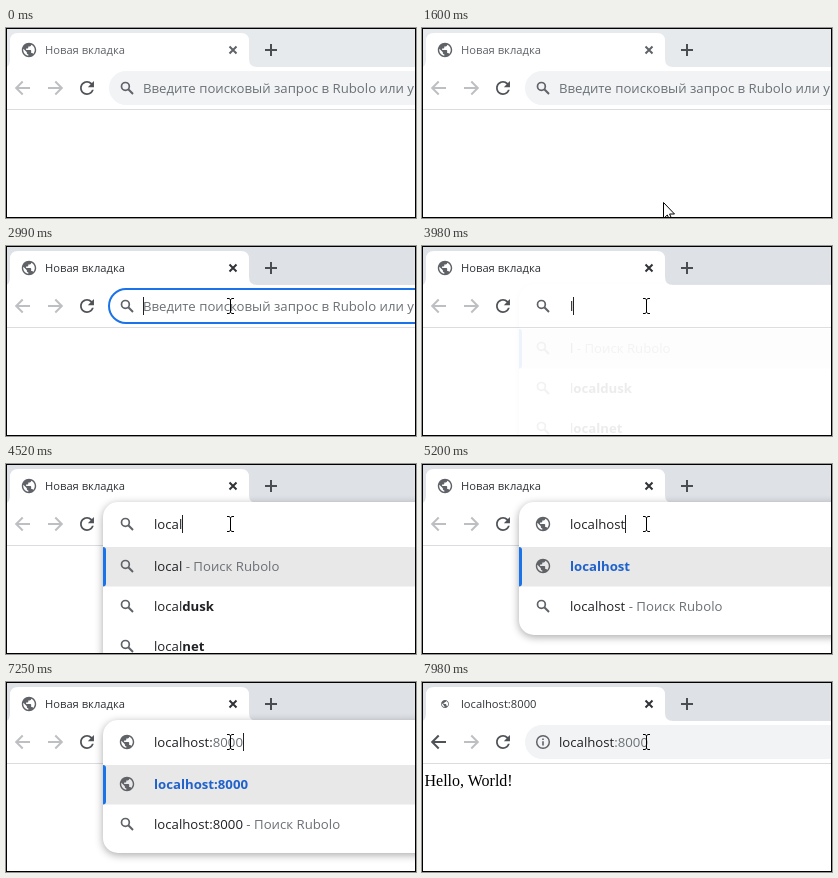
An HTML page for the animation above (8 s loop, 410 by 190 pixels).

```html
<!DOCTYPE html>
<html lang="ru">
<head>
<meta charset="utf-8">
<title>localhost</title>
<style>
  html, body { margin: 0; width: 100%; height: 100%; overflow: hidden; background: #fff; }
  svg { display: block; width: 410px; height: 190px; }
  text { font: 13.2px "Open Sans", "Noto Sans", sans-serif; fill: #202124; white-space: pre; }
  .b { font-weight: 700; }
  .url { font-weight: 700; fill: #1f62cc; }
  .dim { fill: #6b7075; }
  #title { font-size: 11.2px; }
  #page { font: 16px "Liberation Serif", serif; fill: #000; }
  .line { fill: none; stroke: currentColor; stroke-width: 2; }
</style>
</head>
<body>
<svg viewBox="0 0 410 190">
  <defs>
    <filter id="blur" x="-10%" y="-20%" width="120%" height="140%"><feGaussianBlur stdDeviation="4"/></filter>
    <g id="globe"><path transform="scale(.72) translate(-12 -12)" fill="currentColor" d="M12 2C6.48 2 2 6.48 2 12s4.48 10 10 10 10-4.48 10-10S17.52 2 12 2zm-1 17.93c-3.95-.49-7-3.85-7-7.93 0-.62.08-1.21.21-1.79L9 15v1c0 1.1.9 2 2 2v1.93zm6.9-2.54c-.26-.81-1-1.39-1.9-1.39h-1v-3c0-.55-.45-1-1-1H8v-2h2c.55 0 1-.45 1-1V7h2c1.1 0 2-.9 2-2v-.41c2.93 1.19 5 4.06 5 7.41 0 2.08-.8 3.97-2.1 5.39z"/></g>
    <g id="search" class="line"><circle cx="-1.6" cy="-1.6" r="3.9" stroke-width="1.7"/><path d="M1.3 1.3L6 6"/></g>
    <g id="info" class="line"><circle r="6.3" stroke-width="1.5"/><path stroke-width="1.6" d="M0 -3.6v1.6M0 -.8v4.2"/></g>
    <path id="back" class="line" d="M7 0H-6M-.3 -6.5L-6.8 0L-.3 6.5"/>
    <path id="reload" transform="scale(.87) translate(-12 -12)" fill="currentColor" d="M17.65 6.35C16.2 4.9 14.21 4 12 4c-4.42 0-7.99 3.58-7.99 8s3.57 8 7.99 8c3.73 0 6.84-2.55 7.73-6h-2.08c-.82 2.33-3.04 4-5.65 4-3.31 0-6-2.69-6-6s2.69-6 6-6c1.66 0 3.14.69 4.22 1.78L13 11h7V4l-2.35 2.35z"/>
    <path id="cross" class="line" d="M-5.5 -5.5L5.5 5.5M5.5 -5.5L-5.5 5.5"/>
  </defs>

  <rect width="410" height="190" fill="#fff"/>
  <rect id="strip" width="410" height="39"/>
  <path fill="#fff" d="M0 39Q4 38 4 31V13Q4 5 12 5H235Q243 5 243 13V31Q243 39 251 39Z"/>
  <g id="favicon" color="#5f6368"><use href="#globe"/></g>
  <path id="spinner" fill="none" stroke="#1a73e8" stroke-width="2" d="M0 -7A7 7 0 0 1 7 0"/>
  <text id="title" x="39" y="26"></text>
  <path id="close" class="line" stroke-width="1.7" d="M223.5 18.5l7 7m0 -7l-7 7"/>
  <path class="line" color="#4a4d51" d="M259 22h12M265 16v12"/>

  <path d="M0 81.5H410" stroke="#dadce0"/>
  <use id="prev" href="#back" x="17" y="60"/>
  <use href="#back" transform="translate(49 60) scale(-1 1)" color="#bdbfc2"/>
  <g transform="translate(81 60)" color="#4f5357"><use id="load"/></g>
  <rect id="pill" x="103" y="43" width="340" height="34" rx="17"/>
  <text id="page" x="2.5" y="104">Hello, World!</text>

  <g id="popup">
    <rect id="shade" x="97" y="40" width="340" rx="15" fill="#000" opacity=".34" filter="url(#blur)"/>
    <rect id="sheet" x="97" y="38" width="340" rx="15" fill="#fff"/>
    <rect x="97" y="83" width="313" height="39.500" fill="#e8e8e8"/>
    <path d="M97 83q3 0 3 3v33.500q0 3 -3 3z" fill="#1a73e8"/>
    <g id="rows"></g>
  </g>
  <use id="kind" x="121" y="60" color="#5f6368"/>
  <text id="field" y="65"></text>
  <path id="caret" stroke="#202124" d="M.5 51v18"/>
  <path id="arrow" fill="#fff" stroke="#000" d="M.5 .5V16.500L4.300 13L6.800 18.500L9 17.500L6.600 12H11.500Z"/>
  <path id="beam" fill="none" stroke="#000" d="M-3 -7.500h2l1.500 1l1.500 -1h2M.5 -6.500V6.500M-3 7.500h2l1.500 -1l1.500 1h2"/>
  <rect x=".5" y=".5" width="409" height="189" fill="none" stroke="#000"/>
</svg>
<script>
const LOOP = 8000, FOCUS = 2990, TYPE = 3980, ENTER = 7580;
const ENGINE = 'Rubolo';
const HINT = `Введите поисковый запрос в ${ENGINE} или укажите URL`;
const keys = [
  [FOCUS, ''], [TYPE, 'l'], [4190, 'loc'], [4320, 'loca'], [4520, 'local'],
  [4860, 'localh'], [5050, 'localho'], [5120, 'localhos'], [5200, 'localhost'],
  [5530, 'localhost:'], [6320, 'localhost:8'], [6650, 'localhost:80'],
  [6850, 'localhost:800'], [7250, 'localhost:8000']
];
const path = [[1400, 245, 186], [1700, 236, 160], [2150, 216, 114], [2500, 217, 90], [2850, 224, 60]];

const el = {};
document.querySelectorAll('svg [id]').forEach(n => el[n.id] = n);
const set = (id, attrs) => { for (const k in attrs) el[id].setAttribute(k, attrs[k]); };
const show = (id, on) => set(id, { visibility: on ? 'visible' : 'hidden' });
const span = (cls, s) => `<tspan class="${cls}">${s}</tspan>`;
const html = (id, s) => { if (el[id].last !== s) el[id].innerHTML = el[id].last = s; };

function mouse(t) {
  const step = 1450 / 21;
  const q = Math.min(2850, 1400 + Math.floor((t - 1400) / step + .01) * step);
  const i = Math.max(1, path.findIndex(p => p[0] >= q - .01));
  const [a, b] = [path[i - 1], path[i]];
  const k = (q - a[0]) / (b[0] - a[0]);
  return [1, 2].map(n => Math.round(a[n] + (b[n] - a[n]) * k));
}

const row = (i, icon, text) =>
  `<use href="#${icon}" x="121" y="${102 + 40 * i}" color="#5f6368"/><text x="148" y="${107 + 40 * i}">${text}</text>`;

// Suggestions for what has been typed so far
function suggest(s) {
  const find = ['search', s + span('dim', ` - Поиск ${ENGINE}`)];
  if (s.length < 6) {
    const more = w => ['search', s + span('b', w.slice(s.length))];
    return [find, more('localdusk'), more('localnet')];
  }
  if (s.length < 9) return [find];
  if (s === 'localhost:') return [find, ['globe', span('url', 'localhost')]];
  return [['globe', span('url', s)], find];
}

function draw(t) {
  const active = t >= FOCUS, typing = t >= TYPE && t < ENTER, done = t >= ENTER;
  const loaded = t >= 7715, idle = t >= 7915;
  const ink = active ? '#303337' : '#5f6368';
  const [x, y] = mouse(t);
  const over = y < 78;

  set('strip', { fill: active ? '#dee1e6' : '#e7eaed' });
  html('title', done ? 'localhost:8000' : 'Новая вкладка');
  el.title.style.fill = ink;
  set('close', { color: ink });
  const size = done ? .55 : 1;
  set('favicon', { transform: `translate(23 22) scale(${size})` });
  show('spinner', done && !idle);
  set('spinner', { transform: `translate(23 22) rotate(${(t - ENTER) * .6})` });
  set('prev', { color: loaded ? '#4f5357' : '#bdbfc2' });
  set('load', { href: done && !idle ? '#cross' : '#reload' });
  show('page', loaded);

  const ring = active && t < TYPE;
  set('pill', {
    fill: active && !done ? '#fff' : over && !done ? '#e8eaed' : '#f1f3f4',
    stroke: ring ? '#1a73e8' : 'none', 'stroke-width': 2
  });

  const key = keys.filter(k => k[0] <= t).pop();
  const list = typing ? suggest(key[1]) : [];
  show('popup', typing);
  if (typing) {
    const h = list.length * 40 + 53;
    set('shade', { height: h });
    set('sheet', { height: h });
    set('popup', { opacity: t < 4050 ? .08 : 1 });
    html('rows', list.map((r, i) => row(i, ...r)).join(''));
  }

  set('kind', { href: done ? '#info' : '#' + (typing ? list[0][0] : 'search') });
  const left = typing ? 148 : 137;
  const [host, port] = (typing || done ? key[1] : '').split(':');
  set('field', { x: left });
  html('field', !host ? span('dim', HINT)
    : port === undefined ? host
    : done ? host + span('dim', ':' + port) : host + ':' + span('dim', port));

  const blink = active && !done && (t - key[0]) % 1060 < 530;
  show('caret', blink);
  if (blink) {
    const w = host ? el.field.getComputedTextLength() : 0;
    set('caret', { transform: `translate(${Math.round(left + w)} 0)` });
  }

  show('arrow', t >= 1400 && !over);
  show('beam', t >= 1400 && over);
  set('arrow', { transform: `translate(${x} ${y})` });
  set('beam', { transform: `translate(${x} ${y})` });
}

const start = performance.now();
function tick() {
  draw((performance.now() - start) % LOOP);
  requestAnimationFrame(tick);
}
tick();
</script>
</body>
</html>
```
